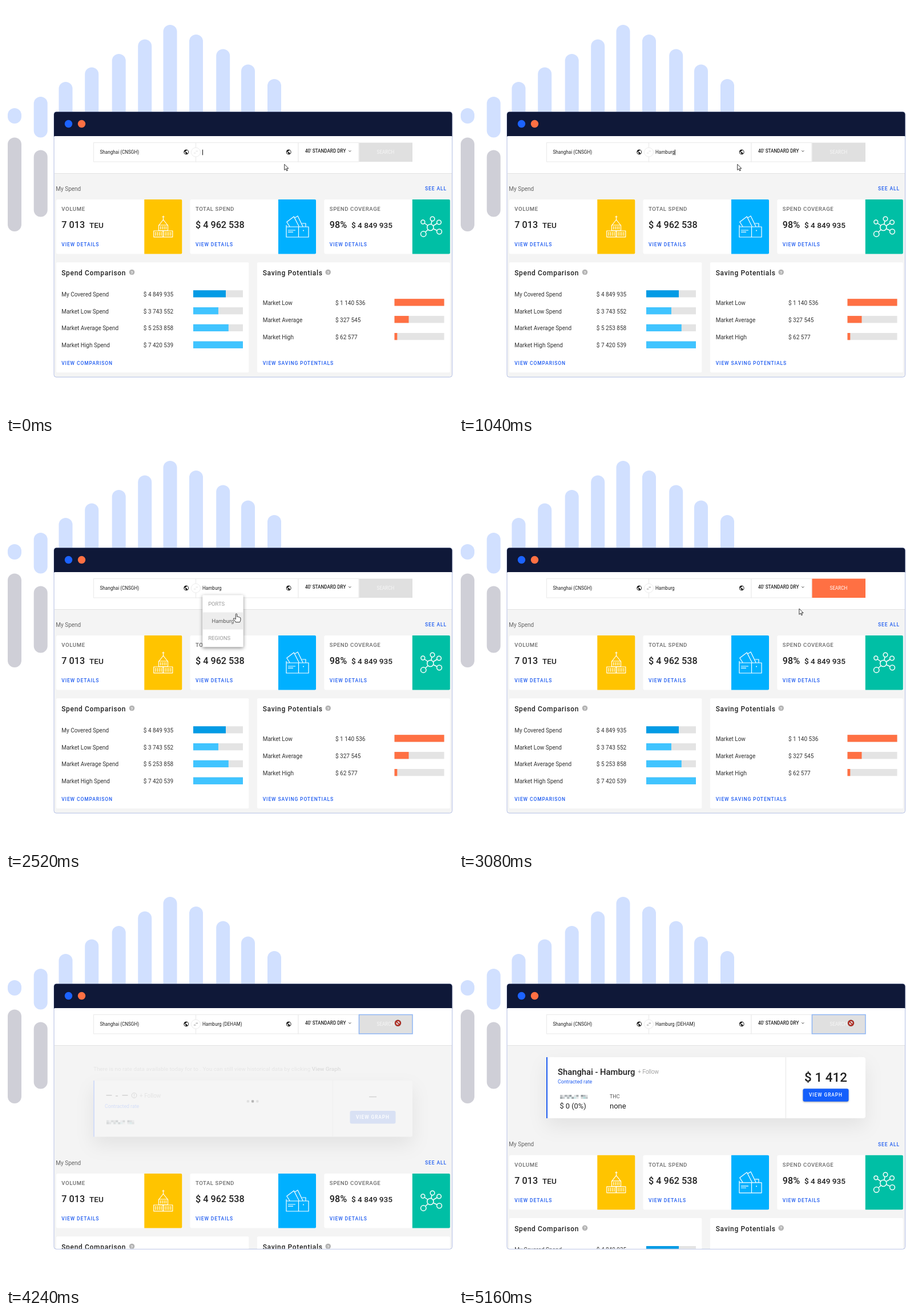
An HTML page that plays this animation: 783x715 px, repeating every 6520 ms.

```html
<!DOCTYPE html>
<html lang="en">
<head>
<meta charset="utf-8">
<title>Freight rate search</title>
<style>
html, body { margin: 0; width: 100%; height: 100%; overflow: hidden; background: #fff; }
svg { display: block; width: 783px; height: 715px; font-family: Roboto, Arial, sans-serif; }
text { white-space: pre; fill: #212121; font-size: 10px; }
.field { font-size: 8.15px; }
.med { font-weight: 500; }
.link { font-size: 8.5px; font-weight: 500; letter-spacing: .9px; fill: #1f5cf0; }
.label { font-size: 9.6px; font-weight: 500; letter-spacing: .57px; fill: #6b6b6b; }
.big { font-size: 16.2px; font-weight: 500; }
.mid { font-size: 13.6px; font-weight: 500; }
.title { font-size: 12px; font-weight: 500; letter-spacing: .67px; }
.row { fill: #333; }
.item { font-size: 9.4px; fill: #999; }
.btn { font-size: 8.3px; font-weight: 500; letter-spacing: .95px; fill: #fff; }
.icon { fill: none; stroke: #fff; stroke-width: 1.2; stroke-linejoin: round; }
.shade { filter: drop-shadow(0 2px 3px rgba(0,0,0,.45)); }
.lift { filter: drop-shadow(0 14px 16px rgba(0,0,0,.07)); }
</style>
</head>
<body>
<svg id="stage" viewBox="0 0 783 715"></svg>
<script>
const LOOP = 6520, STEP = 40;

const rect = (x, y, w, h, fill, more = '') =>
  `<rect x="${x}" y="${y}" width="${w}" height="${h}" fill="${fill}" ${more}/>`;
const text = (x, y, cls, str, more = '') =>
  `<text x="${x}" y="${y}" class="${cls}" ${more}>${str}</text>`;
const circle = (x, y, r, more = '') => `<circle cx="${x}" cy="${y}" r="${r}" ${more}/>`;
const path = (d, more = '') => `<path d="${d}" ${more}/>`;
const group = (id, body, more = '') => `<g id="${id}" ${more}>${body}</g>`;
const pill = (x, y, end, fill) => rect(x, y, 24, end - y, fill, 'rx="12"');

function backdrop() {
  const tops = [[92.5, 133], [138.2, 107.5], [185.7, 84], [231.2, 58.5], [275.5, 33],
    [321, 50], [368.2, 75.5], [412, 102.5], [458, 128]];
  const blue = '#d1e0ff', grey = '#cfcfd7';
  return tops.map(([x, y]) => pill(x, y, 215, blue)).join('') +
    pill(3, 179, 206, blue) + pill(48.7, 159, 230.5, blue) +
    pill(3, 230.5, 395, grey) + pill(48.7, 252.5, 369.5, grey);
}

const globe = x => path('M12 2a10 10 0 1 0 0 20a10 10 0 1 0 0-20zm-1 17.93c-3.95-.49-7-3.85-7-7.93 0-.62.08-1.21.21-1.79L9 15v1c0 1.1.9 2 2 2v1.93zm6.9-2.54c-.26-.81-1-1.39-1.9-1.39h-1v-3c0-.55-.45-1-1-1H8v-2h2c.55 0 1-.45 1-1V7h2c1.1 0 2-.9 2-2v-.41c2.93 1.19 5 4.06 5 7.41 0 2.08-.8 3.97-2.1 5.39z',
  `fill="#1c1c1c" transform="translate(${x - 5.3} 250.6) scale(.44)"`);

function searchBar() {
  const box = (x, w) => rect(x, 239.5, w, 33.5, '#fff', 'stroke="#e9e9e9"');
  return rect(85, 228, 696, 65, '#fff') + rect(85, 293, 696, 1, '#e2e2e2') +
    box(153.5, 179) + box(332.5, 179.5) + box(512, 106) +
    text(164.5, 259.2, 'field', 'Shanghai (CNSGH)') +
    globe(315.7) + globe(495.2) +
    circle(332.5, 256.2, 8, 'fill="#fff" stroke="#ececec"') +
    path('M332 254.5h3.6m-1.5-1.6l1.6 1.6-1.6 1.6M333 257.8h-3.6m1.5-1.6l-1.6 1.6 1.6 1.6',
      'id="swap" fill="none" stroke-width=".9"') +
    text(344, 259.2, 'field', '', 'id="typed"') +
    rect(344, 251.7, 1, 9.6, '#111', 'id="caret"') +
    text(524, 257.4, 'field med', "40' STANDARD DRY") +
    path('M600.3 253.2l2 2 2-2', 'fill="none" stroke="#333" stroke-width=".9"') +
    rect(618.5, 239.5, 93.5, 33.5, '#e0e0e0', 'id="button"') +
    text(665, 259.4, 'field', 'SEARCH', 'id="search" text-anchor="middle"');
}

function slats(x, y, w, h, n) {
  let d = `M${x} ${y}h${w}v${h}h${-w}z`;
  for (let i = 1; i < n; i++) d += `M${x + w * i / n} ${y + 2}v${h - 4}`;
  return d;
}
const cargo = () => path('M275.5 367.5v7M273.5 369.5h4M275.5 374.5l-7.5 9.5h15z' +
  slats(267.5, 384, 16, 9.5, 5) + slats(258.8, 394, 16.2, 10.8, 5) + slats(275.6, 394, 16.2, 10.8, 5), 'class="icon"');
const wallet = () => path('M491 387h39v18h-39zM512.5 387v18M491 384l0 3M494 393h13M494 396.2h9' +
  'M497 386.5l-5.2-8 12.5-9.5 9 17.5M505.5 371.5l5.5-3.5 9 18.5M518.5 381h6.5v6', 'class="icon"') +
  circle(521, 393.5, 1, 'fill="#fff"');
const network = () => {
  const nodes = [[747, 373, 3.8], [730.3, 378.5, 3.4], [758.5, 379, 3.8], [731.2, 399.5, 4.7], [759, 395.3, 4.4]];
  const line = nodes.map(([x, y]) => `M743.3 388L${x} ${y}`).join('');
  const dot = ([x, y, r]) => circle(x, y, r, 'fill="#00bfa5"');
  return `<g class="icon" style="stroke-width:1.5">${path(line)}${[...nodes, [743.3, 388, 5.6]].map(dot).join('')}</g>`;
};

function card(x, name, value, unit, unitX, color, icon) {
  return rect(x, 339, 220.5, 95.5, '#fff', 'rx="3"') +
    path(`M${x + 154.5} 339h64a2 2 0 0 1 2 2v91.5a2 2 0 0 1-2 2h-64z`, `fill="${color}"`) + icon +
    text(x + 9.5, 359, 'label', name) + text(x + 9.5, 389.3, 'big', value) +
    text(unitX, 389.3, 'mid', unit) + text(x + 9.5, 421.2, 'link', 'VIEW DETAILS');
}

const help = x => circle(x, 466.5, 4.8, 'fill="#b4b4b4"') +
  text(x, 469.5, 'med', '?', 'text-anchor="middle" style="font-size:8px;fill:#fff"');

const row = (x, valueX, barX, y, name, value, part, color) =>
  text(x, y, 'row', name) + text(valueX, y, 'row', value) +
  rect(barX, y - 10.5, 87, 12.3, '#e4e4e4') + rect(barX, y - 10.5, 87 * part, 12.3, color);

function dashboard() {
  const left = [['My Covered Spend', '$ 4 849 935', .655, '#039be5'], ['Market Low Spend', '$ 3 743 552', .505, '#40c4ff'],
    ['Market Average Spend', '$ 5 253 858', .71, '#40c4ff'], ['Market High Spend', '$ 7 420 539', 1, '#40c4ff']];
  const right = [['Market Low', '$ 1 140 536', 1], ['Market Average', '$ 327 545', .287], ['Market High', '$ 62 577', .055]];
  return text(87.3, 323.5, '', 'My Spend', 'style="fill:#666"') + text(734, 323, 'link', 'SEE ALL') +
    card(87.8, 'VOLUME', '7 013', 'TEU', 146, '#ffc400', cargo()) +
    card(322.5, 'TOTAL SPEND', '$ 4 962 538', '', 0, '#00b0ff', wallet()) +
    card(557.3, 'SPEND COVERAGE', '98%', '$ 4 849 935', 605, '#00bfa5', network()) +
    rect(88, 449.3, 337.3, 193, '#fff', 'rx="2"') + rect(440, 449.3, 337.8, 193, '#fff', 'rx="2"') +
    text(97.2, 472, 'title', 'Spend Comparison') + help(220.5) +
    text(449.7, 472, 'title', 'Saving Potentials') + help(564.2) +
    left.map((r, i) => row(97.2, 240.8, 328, 508.7 + i * 29.8, ...r)).join('') +
    right.map((r, i) => row(449.7, 577, 680.5, 523.7 + i * 29.9, ...r, '#ff7043')).join('') +
    text(97.2, 628.7, 'link', 'VIEW COMPARISON') + text(449.7, 628.7, 'link', 'VIEW SAVING POTENTIALS');
}

function mosaic(x, y) {
  let out = '';
  for (let i = 0; i < 24; i++) {
    const tone = (i * 37 + 11) % 23;
    const col = i % 12;
    if (col === 5 && i < 12 || col === 8) continue;
    out += rect(x + col * 4.05, y + (i < 12 ? 0 : 3.5), 4.05, 3.5, tone % 5 ? '#8d9499' : '#a9d4d4', `opacity="${.15 + tone / 28}"`);
  }
  return out;
}

function waiting() {
  const faint = 'style="fill:#e3e3e3"';
  return text(153, 338, '', 'There is no rate data available today for to . You can still view historical data by clicking <tspan class="med" fill="#dcdcdc">View Graph</tspan>.',
      'style="font-size:9.9px;fill:#e5e5e5"') +
    rect(153, 355, 559, 98.5, '#f5f5f5', 'rx="3" class="lift"') + rect(153, 355, 2, 98.5, '#d3ddf8') +
    rect(572, 355, 1, 98.5, '#efefef') +
    path('M175.5 380.8h10M192 382h4M203.5 380.8h10M636 383.5h13', 'stroke="#d2d2d2" stroke-width="1.5"') +
    circle(224.5, 381, 4.4, 'fill="none" stroke="#d8d8d8"') +
    path('M224.5 378.5v3M224.5 382.7v1', 'stroke="#d8d8d8"') +
    text(234, 384.5, '', '+ Follow', faint) +
    text(173, 403, '', 'Contracted rate', 'style="font-size:8.75px;fill:#d3ddf8"') +
    `<g opacity=".35">${mosaic(176, 424.5)}</g>` +
    rect(602.5, 408, 80, 22.5, '#d9e1f4', 'rx="3"') + text(613, 422, 'btn', 'VIEW GRAPH') +
    [0, 1, 2].map(i => rect(421.8 + i * 8.2, 389.3, 4.2, 4.2, '#8d8d8d', 'class="dot" rx="1"')).join('');
}

function result() {
  return rect(153, 314, 559, 107, '#fff', 'rx="4" class="lift"') + rect(153, 314, 2, 107, '#1f5cf0') +
    rect(572, 314, 1, 107, '#e6e6e6') +
    text(173, 344.7, 'med', 'Shanghai - Hamburg', 'style="font-size:14.8px"') +
    text(313.3, 343, '', '+ Follow', 'style="fill:#777;font-weight:300"') +
    text(173, 359.5, '', 'Contracted rate', 'style="font-size:8.75px;fill:#1f5cf0"') +
    mosaic(177, 380) +
    text(176.5, 403.6, '', '$ 0 (0%)', 'style="font-size:12.8px"') +
    text(264, 385.6, '', 'THC', 'style="font-size:8.9px;fill:#555"') +
    text(264, 403.6, '', 'none', 'style="font-size:13px"') +
    text(642.5, 356.8, 'med', '$ 1 412', 'text-anchor="middle" style="font-size:22.4px"') +
    rect(602.5, 369.3, 80, 22.5, '#145ffb', 'rx="3" style="filter:drop-shadow(0 1px 1.5px rgba(0,0,0,.35))"') +
    text(613, 383.4, 'btn', 'VIEW GRAPH');
}

const menu = () => rect(0, 0, 71.5, 91, '#fff', 'rx="1.5" class="shade"') + rect(0, 30.3, 71.5, 30, '#ededed') +
  text(10, 18.7, 'item', 'PORTS') + text(16.3, 48.7, 'item', 'Hamburg', 'style="fill:#5c5c5c"') +
  text(10, 78.7, 'item', 'REGIONS');

const pointers = () =>
  path('M0 0V10.2L2.4 8 4 11.6 5.6 10.9 4 7.4H7.2Z', 'id="arrow" fill="#fff" stroke="#222" stroke-width=".9" stroke-linejoin="round"') +
  path('M-1.2 1.2Q-1.2 0 0 0T1.2 1.2V5.2Q3.3 4.3 3.7 5.9 5.4 5.1 5.8 6.6 7.4 6.2 7.4 8V11Q7 13 6 14.8H-1.2Q-2.5 12-5.2 9.2-5 7-3 8.2L-1.2 9.8Z',
    'id="hand" fill="#fff" stroke="#222" stroke-width=".9" stroke-linejoin="round"') +
  group('deny', circle(0, 0, 4.4, 'fill="#e9dcdb" stroke="#5b1510" stroke-width="2.5"') +
    circle(0, 0, 4.4, 'fill="none" stroke="#c8352a" stroke-width="1.6"') + path('M-3-3l6 6', 'stroke="#b52a20" stroke-width="1.7"'));

document.getElementById('stage').innerHTML =
  '<clipPath id="view"><rect x="85" y="294" width="696" height="355.8"/></clipPath>' + backdrop() +
  rect(84, 185.5, 697.5, 464.8, '#f4f4f4', 'rx="4" stroke="#b6c1e6"') +
  path('M84 228.5V190a4.5 4.5 0 0 1 4.5-4.5H777a4.5 4.5 0 0 1 4.5 4.5V228.5z', 'fill="#0f1838"') +
  circle(109.5, 206.5, 6.7, 'fill="#1c63ff"') + circle(132.5, 206.5, 6.7, 'fill="#ff7043"') +
  searchBar() +
  `<g clip-path="url(#view)">${group('wait', waiting())}${group('card', result())}${group('page', dashboard())}</g>` +
  group('menu', menu()) + group('cursor', pointers());

const $ = id => document.getElementById(id);
const dots = document.querySelectorAll('.dot');
const clamp = v => Math.min(1, Math.max(0, v));
const span = (t, from, to) => clamp((t - from) / (to - from));
const show = (id, on) => $(id).style.display = on ? '' : 'none';
const attr = (id, set) => { for (const k in set) $(id).setAttribute(k, set[k]); };

const keys = [280, 480, 560, 720, 800, 880, 1040];
const caretX = [0, .713, 1.257, 2.133, 2.694, 3.245, 3.584, 4.145];

function pointerAt(t) {
  if (t < 2840) {
    const u = span(t, 1800, 2440);
    return [487.7 - 84.2 * u ** 1.1, 277.3 + 23.7 * u * u];
  }
  const u = span(t, 2840, 3440);
  return [403.5 + 283 * (1 - (1 - u) ** 2.23), 301 - 46.8 * u ** 1.81];
}

function draw(t) {
  const count = keys.filter(k => t >= k).length;
  $('typed').textContent = t >= 3920 ? 'Hamburg (DEHAM)' : 'Hamburg'.slice(0, count);
  attr('caret', { x: 344 + caretX[count] * 8.15 });
  show('caret', t < 1480 || t >= 1800 && t < 2280);

  const ready = t >= 2600, sent = t >= 3520, done = t >= 4520;
  attr('swap', { stroke: ready ? '#b0b0b0' : '#e9e9e9' });
  attr('button', { fill: ready && !sent ? '#ff7043' : '#e0e0e0', stroke: t >= 3440 ? '#8fb6f5' : 'none', 'stroke-width': 1.5 });
  $('search').style.fill = ready && !sent ? '#fff' : '#f6f6f6';

  const size = .8 + .2 * span(t, 1840, 2080);
  show('menu', t >= 1840 && t < 2960);
  attr('menu', {
    transform: `translate(344.2 268.2) scale(${size})`,
    opacity: (.4 + .6 * span(t, 1800, 1920)) * (1 - span(t, 2800, 2960))
  });

  show('wait', sent && !done);
  show('card', done);
  attr('card', { opacity: .12 + .88 * span(t, 4520, 4880) });
  attr('page', { transform: `translate(0 ${done ? 146.8 : sent ? 179 : 0})` });
  const lit = t < 3920 ? 0 : Math.floor((t - 3920) / 160 + 2) % 3;
  dots.forEach((d, i) => d.setAttribute('opacity', i === lit ? .6 : .2));

  const [x, y] = pointerAt(t);
  const hand = !sent && (x < 416 || x > 618 && y < 273);
  attr('cursor', { transform: `translate(${x} ${y})` });
  show('deny', sent);
  show('hand', hand);
  show('arrow', !sent && !hand);
}

function tick(now) {
  draw(Math.floor(now % LOOP / STEP) * STEP);
  requestAnimationFrame(tick);
}
draw(0);
requestAnimationFrame(tick);
</script>
</body>
</html>
```
